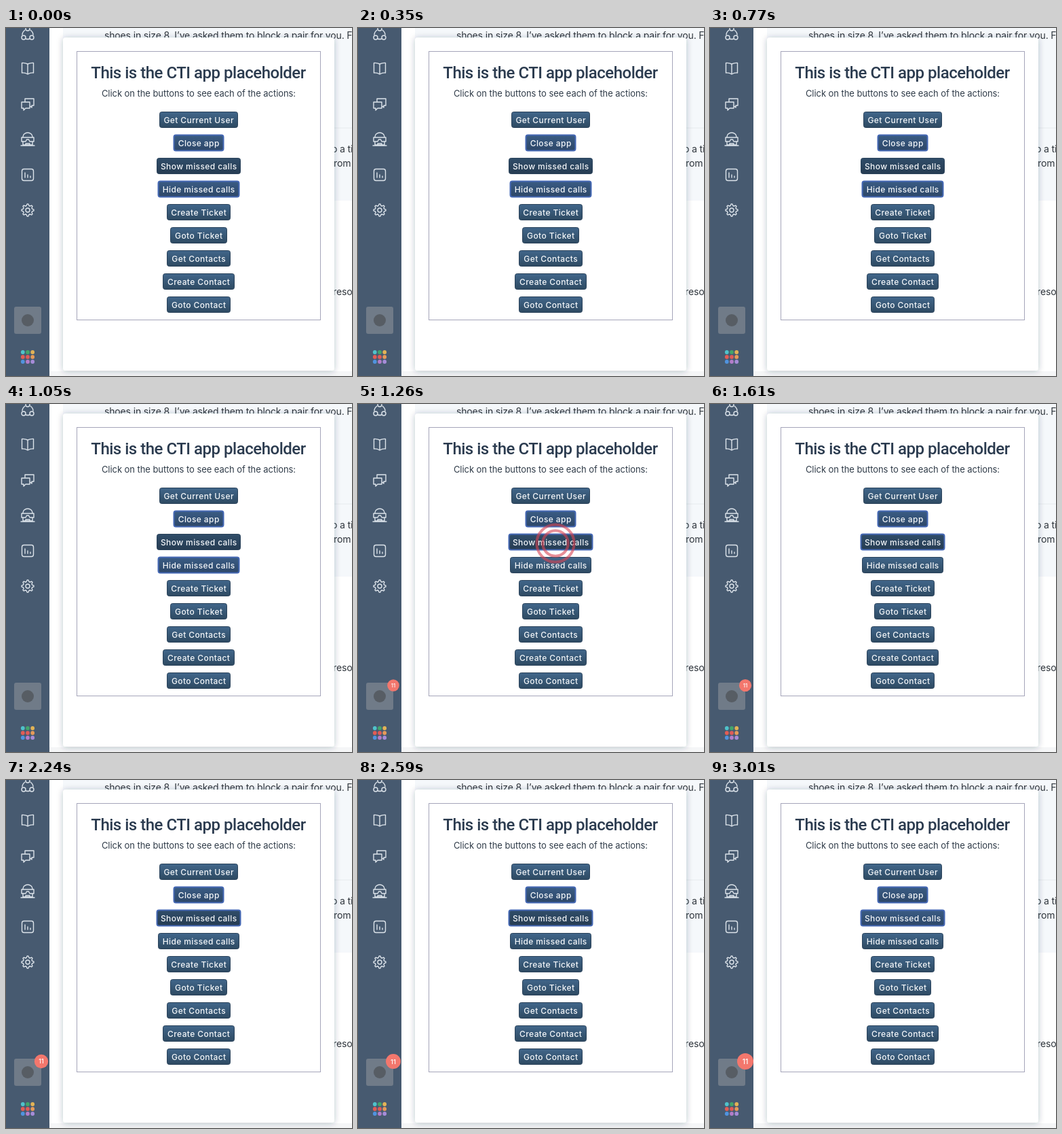
Recreate the animation shown at these times as an HTML page. Size 510x512 px, loop 3080 ms.

```html
<!DOCTYPE html>
<html lang="en">
<head>
<meta charset="utf-8">
<title>App placeholder</title>
<style>
  html, body { margin: 0; width: 100%; height: 100%; overflow: hidden; background: #fff; }
  svg { display: block; width: 510px; height: 512px; }
  text { font-family: Inter, "Noto Sans", sans-serif; }
  .page text { font-size: 14px; letter-spacing: -.15px; fill: #30363d; }
  .mid { text-anchor: middle; }
  .title { font: 500 24px Roboto, Inter, sans-serif; letter-spacing: -.5px; fill: #2b3b4f; }
  .sub { font-size: 13px; letter-spacing: -.06px; fill: #2f3b48; }
  .icons { fill: none; stroke: #dce3ea; stroke-width: 1.4; stroke-linejoin: round; stroke-linecap: round; }
  .button rect { fill: url(#normal); stroke: #2b435b; }
  .button text { font-size: 12px; font-weight: 500; letter-spacing: .4px; fill: #f4f7fa; }
  .button.hover rect { fill: url(#dark); }
  .button.focus rect { fill: url(#active); stroke: #4568b4; stroke-width: 2px; }
  .button.focus.hover rect { fill: url(#dark); }
  #badge { fill: #f3776d; }
  #badge text { font-size: 10.5px; font-weight: 500; fill: #fff; }
  #ripple { fill: none; stroke: #d84453; stroke-width: 4; }
</style>
</head>
<body>
<svg id="stage" viewBox="0 0 510 512">
  <defs>
    <linearGradient id="normal" x2="0" y2="1"><stop stop-color="#41668a"/><stop offset="1" stop-color="#2e4a62"/></linearGradient>
    <linearGradient id="dark" x2="0" y2="1"><stop stop-color="#304d69"/><stop offset="1" stop-color="#263c52"/></linearGradient>
    <linearGradient id="active" x2="0" y2="1"><stop stop-color="#3a5c84"/><stop offset="1" stop-color="#2d4768"/></linearGradient>
    <filter id="shadow" x="-10%" y="-10%" width="120%" height="120%">
      <feDropShadow dx="0" dy="1" stdDeviation="5" flood-color="#26323f" flood-opacity=".28"/>
    </filter>
  </defs>

  <g class="page">
    <rect width="510" height="512" fill="#fff"/>
    <rect x="84" width="426" height="254" fill="#f5f8fb"/>
    <path d="M484 147H510" stroke="#e6eaee"/>
    <rect x="64" y="505" width="446" height="7" fill="#f5f6f7"/>
    <text x="145" y="16">shoes in size 8. I’ve asked them to block a pair for you. F</text>
    <text x="480" y="183">o a ti</text>
    <text x="483" y="204">rom</text>
    <text x="482" y="393">reso</text>
  </g>

  <rect x="84" y="14" width="400" height="490" rx="4" fill="#fff" filter="url(#shadow)"/>
  <rect x="104.5" y="34.5" width="359" height="395" fill="none" stroke="#a5a5ba"/>
  <text class="mid title" x="283.5" y="74">This is the CTI app placeholder</text>
  <text class="mid sub" x="284" y="101">Click on the buttons to see each of the actions:</text>
  <g id="buttons"></g>

  <rect width="64" height="512" fill="#475a70"/>
  <g class="icons">
    <circle cx="32" cy="1" r="3"/><circle cx="26" cy="14" r="3"/><circle cx="38" cy="14" r="3"/>
    <path d="M28 3Q24 6 24 10M36 3Q40 6 40 10M29.5 16Q32 17 34.5 16"/>
    <path d="M32 53Q28 51 23.5 51.5V66Q28 65.5 32 68Q36 65.5 40.5 66V51.5Q36 51 32 53V68"/>
    <path d="M28 108V104H41V114H38V117L35 114.5M23 109H35V118H29L26 121V118H23Z"/>
    <path d="M25 161V160A7 6 0 0 1 39 160V161M23 161H41V167H35L33.5 164H30.5L29 167H23ZM25 167V172H39V167M29 172V170H35V172M22 173H42"/>
    <rect x="23.5" y="207.5" width="17" height="17" rx="3"/>
    <path d="M28 213V220M32 216V220M36 218V220"/>
    <path id="gear"/><circle cx="32" cy="268" r="3"/>
  </g>
  <rect x="12" y="410" width="40" height="40" rx="3" fill="#707b88"/>
  <circle cx="32" cy="430" r="9" fill="#575d64"/>
  <g id="dots"></g>

  <g id="badge"><circle r="12"/><text class="mid" y="4">11</text></g>
  <g id="ripple" transform="translate(291 205)"><circle/><circle/></g>
</svg>
<script>
const $ = id => document.getElementById(id);
const STEP = 70, LOOP = 3080;
const CLICK = 1120, BADGE = 1190, RIPPLE = 350, LEAVE = 2800;

const labels = [
  ["Get Current User", 116], ["Close app", 74], ["Show missed calls", 124],
  ["Hide missed calls", 120], ["Create Ticket", 94], ["Goto Ticket", 84],
  ["Get Contacts", 94], ["Create Contact", 106], ["Goto Contact", 94]
];
$("buttons").innerHTML = labels.map(([label, w], i) => `
  <g class="button" transform="translate(284 ${135 + 34 * i})">
    <rect x="${-w / 2 + .5}" y="-11.5" width="${w - 1}" height="23" rx="3"/>
    <text class="mid" x=".2" y="4.5">${label}</text>
  </g>`).join("");
const [, closeApp, show, hide] = $("buttons").children;
closeApp.classList.add("focus");

const colors = ["#4fc3cb", "#43a56b", "#e2b355", "#e25d55", "#df5b58", "#e69a58", "#5093df", "#b37dca", "#a68cd8"];
$("dots").innerHTML = colors.map((c, i) =>
  `<circle cx="${24.8 + i % 3 * 7.2}" cy="${477 + Math.floor(i / 3) * 7}" r="2.9" fill="${c}"/>`).join("");

// Eight teeth, each with two outer and two inner corners
$("gear").setAttribute("d", "M" + Array.from({ length: 32 }, (_, i) => {
  const a = (i - .5) * Math.PI / 16, r = i % 4 < 2 ? 9 : 6.8;
  return `${32 + r * Math.sin(a)} ${268 - r * Math.cos(a)}`;
}).join("L") + "Z");

function draw(t) {
  const clicked = t >= CLICK;
  show.classList.toggle("focus", clicked);
  show.classList.toggle("hover", t < LEAVE);
  hide.classList.toggle("focus", !clicked);

  const grow = Math.max(0, (t - BADGE) / (LOOP - STEP - BADGE));
  const scale = .73 + .27 * grow ** 1.5;
  $("badge").setAttribute("transform", `translate(52 414) scale(${scale})`);
  $("badge").style.display = t < BADGE ? "none" : "";

  const p = (t - CLICK) / RIPPLE, visible = p >= 0 && p < 1;
  $("ripple").style.opacity = visible ? 1 - p : 0;
  if (visible) [...$("ripple").children].forEach((ring, i) =>
    ring.setAttribute("r", (14 + 34 * p) * (i ? .68 : 1)));
}

const start = performance.now();
function tick() {
  const t = (performance.now() - start) % LOOP;
  draw(Math.floor(t / STEP) * STEP);
  requestAnimationFrame(tick);
}
tick();
</script>
</body>
</html>
```
